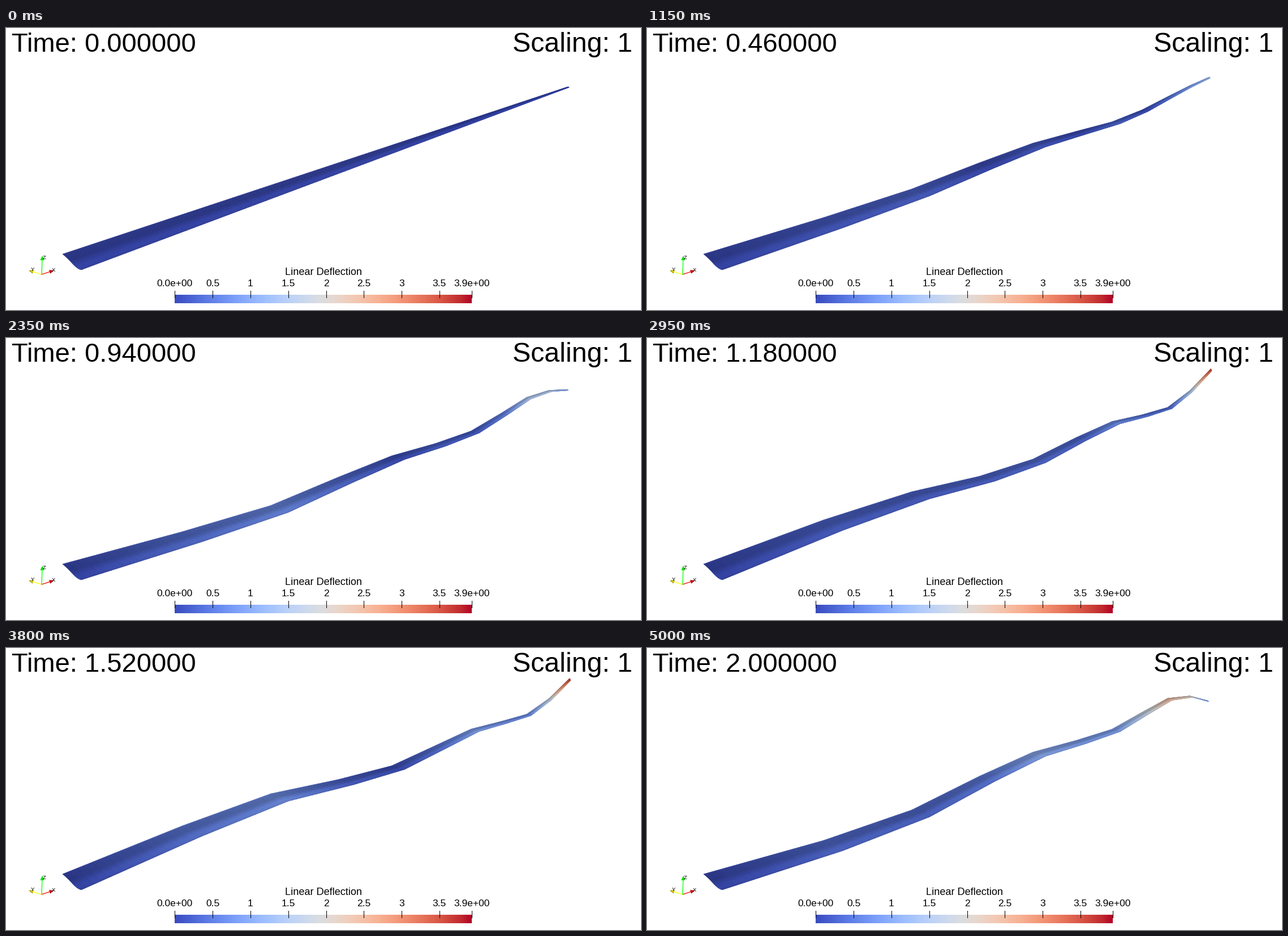
A matplotlib script for the animation above (5050 ms loop, 1122 by 499 pixels).

```python
import matplotlib.pyplot as plt
import numpy as np
from matplotlib.animation import FuncAnimation
from matplotlib.collections import PolyCollection

W, H, DPI = 1122, 499, 100
FRAMES, STEP, INTERVAL = 101, 0.02, 50
VMAX = 3.93
SUB, CHORD = 16, 16          # cells per span segment / across the chord
UNIT = 40.5                  # pixels per unit of deflection at the root
cmap = plt.get_cmap("coolwarm")

plt.rcParams["font.family"] = "Liberation Sans"
fig = plt.figure(figsize=(W / DPI, H / DPI), dpi=DPI, facecolor="white")
ax = fig.add_axes([0, 0, 1, 1])
ax.set(xlim=(0, W), ylim=(H, 0))
ax.axis("off")


def label(x, y, s, px, ha="left"):
    return ax.text(x, y, s, fontsize=px * 72 / DPI, ha=ha, va="baseline")


station = np.linspace(0, 1, 11)
fine = np.linspace(0, 1, 10 * SUB + 1)
v = np.linspace(0, 1, CHORD + 1)
v_mid = (v[1:] + v[:-1]) / 2
shade = np.interp(v_mid, [0, 0.1, 0.4, 0.55, 0.7, 0.92, 1],
                  [0.74, 0.68, 0.67, 0.74, 0.83, 0.84, 0.72])
bulge = 9 * v ** 3 * (1 - v)


def mode(beta):
    """Bending mode of a clamped beam, 1 at the free tip."""
    x = beta * station
    k = (np.cosh(beta) + np.cos(beta)) / (np.sinh(beta) + np.sin(beta))
    shape = np.cosh(x) - np.cos(x) - k * (np.sinh(x) - np.sin(x))
    return shape / shape[-1]


MODES = np.array([mode(b) for b in (1.8751, 4.6941, 7.8548, 10.9955, 14.1372)])

# Swing of the two highest modes at a few moments
KEY_T = np.array([0, 0.26, 0.66, 0.94, 1.18, 1.52, 2.0])
FOURTH = np.array([0, 0.10, 0.11, -0.12, 0.38, 0.10, -0.21])
FIFTH = np.array([0, -0.13, -0.37, -0.56, 0.64, 0.70, -0.70])


def smooth(keys, t):
    """Cubic Hermite through the keys, starting at rest."""
    m = np.gradient(keys, KEY_T)
    m[0] = 0
    k = min(np.searchsorted(KEY_T, t, side="right") - 1, len(KEY_T) - 2)
    h = KEY_T[k + 1] - KEY_T[k]
    u = (t - KEY_T[k]) / h
    a = u * u * (3 - 2 * u)
    return (keys[k] * (1 - a) + keys[k + 1] * a
            + h * u * (1 - u) * ((1 - u) * m[k] - u * m[k + 1]))


def deflection(t):
    amps = [1.25 * t - 0.04 * t * t,
            (0.6 + 0.15 * t) * np.sin(1.75 * t),
            (0.38 + 0.1 * t) * np.sin(5.7 * t) + 0.08 * t,
            smooth(FOURTH, t),
            smooth(FIFTH, t)]
    return amps @ MODES


def edge(start, end, depth):
    """Rest line of one edge, stations spaced in perspective, and its scale."""
    w = (1 + depth) * station / (1 + depth * station)
    line = np.outer(1 - w, start) + np.outer(w, end)
    return line, UNIT / (1 + depth * station)


EDGES = [edge((100, 400), (993, 104), 1.802),
         edge((133, 428), (995, 105), 1.95)]


def refine(values):
    return np.interp(fine, station, values)


def blade(t):
    d = deflection(t)
    sides = []
    for line, scale in EDGES:
        lift = d * scale
        x, y = line[:, 0].copy(), line[:, 1] - lift
        x[-1] += 0.12 * (lift[-1] - lift[-2])
        sides.append(np.stack([refine(x), refine(y)], axis=1))
    a, b = sides
    grid = a[:, None] * (1 - v[:, None]) + b[:, None] * v[:, None]
    grid = grid + ((1 - fine) ** 4)[:, None, None] * bulge[:, None] * [-1.5, 1.8]
    quads = np.stack([grid[:-1, :-1], grid[1:, :-1],
                      grid[1:, 1:], grid[:-1, 1:]], axis=2).reshape(-1, 4, 2)

    size = refine(np.abs(d))
    mid = (size[1:] + size[:-1]) / 2
    rgb = cmap(np.clip(1.04 * mid / VMAX, 0, 1))[:, None, :3]
    # the thin outer part catches more light
    glow = (0.05 * np.linspace(0, 1, len(mid)) ** 2)[:, None, None]
    rgb = rgb * np.clip(shade[:, None] + glow, 0, 1)
    return quads, rgb.reshape(-1, 3)


def triad():
    o = np.array([63, 436])
    arms = [((80, 430.5), "#ff0000", "#b00000", "X", (81, 431)),
            ((45, 430.5), "#ffff00", "#a89a00", "Y", (44, 430)),
            ((64, 408), "#00ff00", "#00d800", "Z", (65, 409))]
    for tip, line, cone, name, at in arms:
        tip = np.array(tip)
        d = (tip - o) / np.hypot(*(tip - o))
        n = np.array([-d[1], d[0]])
        ax.plot(*zip(o, tip), color=line, lw=0.9)
        ax.fill(*zip(tip + 5 * d, tip - 3 * d + 3.4 * n, tip - 3 * d - 3.4 * n),
                color=cone, lw=0)
        label(*at, name, 9.5)


def color_bar():
    x0, x1 = 298.4, 823.4
    ax.imshow(np.linspace(0, 1, 256)[None], cmap=cmap, aspect="auto",
              extent=(x0, x1, 487, 472.4), interpolation="bilinear")
    ax.set(xlim=(0, W), ylim=(H, 0))
    for val in [*np.arange(0, 4, 0.5), VMAX]:
        x = x0 + (x1 - x0) * val / VMAX
        ax.plot([x, x], [464.5, 476.5], color="black", lw=0.72)
        name = f"{val:.1e}" if val in (0, VMAX) else f"{val:g}"
        label(x, 457, name, 17.4, "center")
    label(561.5, 437, "Linear Deflection", 18.2, "center")


clock = label(10.5, 41.5, "", 47.1)
label(895, 41.5, "Scaling: 1", 48.2)
triad()
color_bar()
mesh = ax.add_collection(PolyCollection([], linewidths=0.4), autolim=False)


def draw(i):
    t = i * STEP
    quads, rgb = blade(t)
    mesh.set_verts(quads)
    mesh.set_facecolor(rgb)
    mesh.set_edgecolor(rgb)
    clock.set_text(f"Time: {t:.6f}")
    return mesh, clock


anim = FuncAnimation(fig, draw, frames=FRAMES, interval=INTERVAL,
                     init_func=lambda: draw(0), repeat=True, repeat_delay=0)
plt.show()
```
